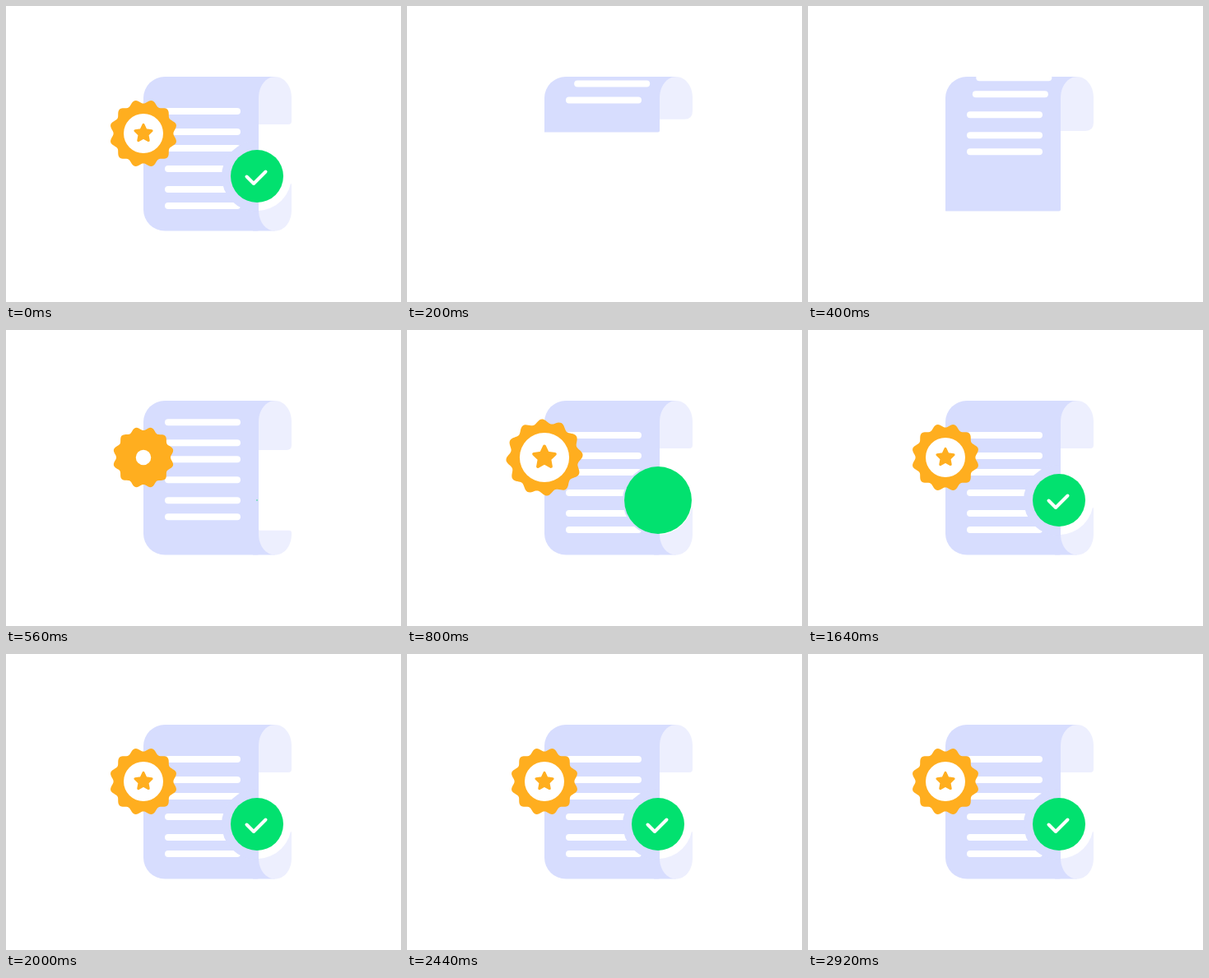
These frames come from a looping animation (480x360 px, 3 s). An HTML page:

```html
<!DOCTYPE html>
<html lang="en">
<head>
<meta charset="utf-8">
<title>Certificate approved</title>
<style>
  html, body { margin: 0; width: 100%; height: 100%; overflow: hidden; background: #fff; }
  svg { display: block; width: 100%; height: 100%; }
</style>
</head>
<body>
<svg viewBox="0 0 480 360">
  <defs>
    <clipPath id="unrolled"><rect id="reveal" x="160" y="80" width="147" rx="2"/></clipPath>
    <clipPath id="onPaper"><rect x="167" y="86" width="140" height="188"/></clipPath>
    <clipPath id="offPaper"><rect x="307" y="86" width="60" height="188"/></clipPath>
  </defs>
  <g id="paper">
    <path fill="#d7ddfe" clip-path="url(#unrolled)" d="M193 86H307V273.500H193A26 26 0 0 1 167 247.500V112A26 26 0 0 1 193 86Z"/>
    <path id="topEdge" fill="#d7ddfe" d="M300 86H327L307 116H300Z"/>
    <path id="bottomEdge" fill="#d7ddfe" d="M300 273.500H327L307 243H300Z"/>
    <path id="topCurl" fill="#edeffe"/>
    <path id="bottomCurl" fill="#edeffe"/>
    <g id="lines" fill="#fff"></g>
  </g>
  <g id="trail">
    <circle cx="305" cy="207" r="43" fill="#d7ddfe" clip-path="url(#onPaper)"/>
    <circle cx="305" cy="207" r="42" fill="#fff" clip-path="url(#offPaper)"/>
  </g>
  <path id="seal" fill="#ffae1f"/>
  <circle id="disc" r="24" fill="#fff"/>
  <path id="star" fill="#ffae1f" stroke="#ffae1f" stroke-width="3" stroke-linejoin="round"/>
  <circle id="green" r="32" fill="#02e16f"/>
  <path id="check" d="M292.500 207.500L301 216L315.500 201.500" fill="none" stroke="#fff" stroke-width="4"
        stroke-linecap="round" stroke-linejoin="round" pathLength="1"/>
</svg>
<script>
const LOOP = 3000;
const LINE_Y = [128, 153, 173, 198, 223, 243];
const $ = id => document.getElementById(id);
const clamp = x => Math.max(0, Math.min(1, x));
const smooth = x => (1 - Math.cos(Math.PI * clamp(x))) / 2;
const show = (el, on) => el.setAttribute('display', on ? 'inline' : 'none');

// Linear interpolation through [time, value] pairs.
function track(t, keys) {
  if (t <= keys[0][0]) return keys[0][1];
  for (let i = 1; i < keys.length; i++) {
    const [t0, v0] = keys[i - 1], [t1, v1] = keys[i];
    if (t < t1) return v0 + (v1 - v0) * (t - t0) / (t1 - t0);
  }
  return keys[keys.length - 1][1];
}

// Scale that overshoots, dips slightly and settles.
function pop(dt) {
  if (dt <= 0) return 0;
  if (dt < 190) return 1.28 * Math.sin(dt / 190 * Math.PI / 2);
  if (dt < 440) return 1.28 - 0.32 * smooth((dt - 240) / 200);
  return 0.96 + 0.04 * smooth((dt - 440) / 340);
}

function radialPath(count, radius) {
  let d = '';
  for (let i = 0; i < count; i++) {
    const a = i / count * 2 * Math.PI, r = radius(a, i);
    d += (i ? 'L' : 'M') + (r * Math.sin(a)).toFixed(2) + ' ' + (-r * Math.cos(a)).toFixed(2);
  }
  return d + 'Z';
}

$('seal').setAttribute('d', radialPath(192, a => 38.8 - 2.4 * Math.cos(12 * a)));
$('star').setAttribute('d', radialPath(10, (a, i) => i % 2 ? 5.2 : 10.6));

const lines = LINE_Y.map(() => {
  const line = document.createElementNS('http://www.w3.org/2000/svg', 'rect');
  line.setAttribute('width', 92);
  line.setAttribute('height', 8);
  line.setAttribute('rx', 4);
  $('lines').append(line);
  return line;
});

function place(id, x, y, scale, turn = 0) {
  show($(id), scale > 0);
  $(id).setAttribute('transform', `translate(${x} ${y}) rotate(${turn}) scale(${scale})`);
}

function drawPaper(t) {
  const bottom = track(t, [[60, 86], [400, 249], [450, 274]]);
  const topEnd = track(t, [[60, 86], [240, 152], [400, 152], [560, 146], [640, 144]]);
  const bottomStart = track(t, [[440, 273], [560, 244], [660, 215]]);
  show($('paper'), bottom > 86);
  $('reveal').setAttribute('height', bottom - 80);

  const open = topEnd > 116, corner = track(t, [[400, 10], [640, 4]]);
  show($('topEdge'), open);
  show($('topCurl'), open);
  $('topCurl').setAttribute('d',
    `M307 ${topEnd}V112C307 97 316 86 327 86C338 86 347 97 347 112V${topEnd - corner}Q347 ${topEnd} ${347 - corner} ${topEnd}Z`);

  const curled = bottomStart < 262;
  show($('bottomEdge'), curled);
  show($('bottomCurl'), curled);
  const side = Math.max(248, bottomStart);
  $('bottomCurl').setAttribute('d',
    `M307 ${bottomStart}H344Q347 ${bottomStart} 347 ${bottomStart + 3}V${side}C347 263 338 273.500 327 273.500C316 273.500 307 263 307 ${side}Z`);

  const scroll = track(t, [[40, -179], [400, -66], [560, -16], [600, -6], [660, 0]]);
  lines.forEach((line, i) => {
    const y = LINE_Y[i] + scroll, rise = Math.max(0, 112 - y);
    show(line, y > 78 && y + 8 < bottom);
    line.setAttribute('x', 193 + 7 * Math.pow(rise / 5, 0.3));
    line.setAttribute('y', y - 4);
  });
}

function draw(time) {
  const t = time < 40 ? LOOP : time;
  drawPaper(t);
  show($('trail'), t > 760);

  const turn = track(t, [[466, -40], [560, -30], [800, -19], [1000, 0]]);
  place('seal', 167, 155, pop(t - 466), turn);
  place('disc', 167, 155, pop(t - 524));
  place('star', 167, 155, pop(t - 560));
  place('green', 305, 207, pop(t - 559));

  const drawn = clamp((t - 1080) / 260);
  show($('check'), drawn > 0);
  $('check').setAttribute('stroke-dasharray', `${drawn} 2`);
}

const start = performance.now();
function tick() {
  draw((performance.now() - start) % LOOP);
  requestAnimationFrame(tick);
}
tick();
</script>
</body>
</html>
```
